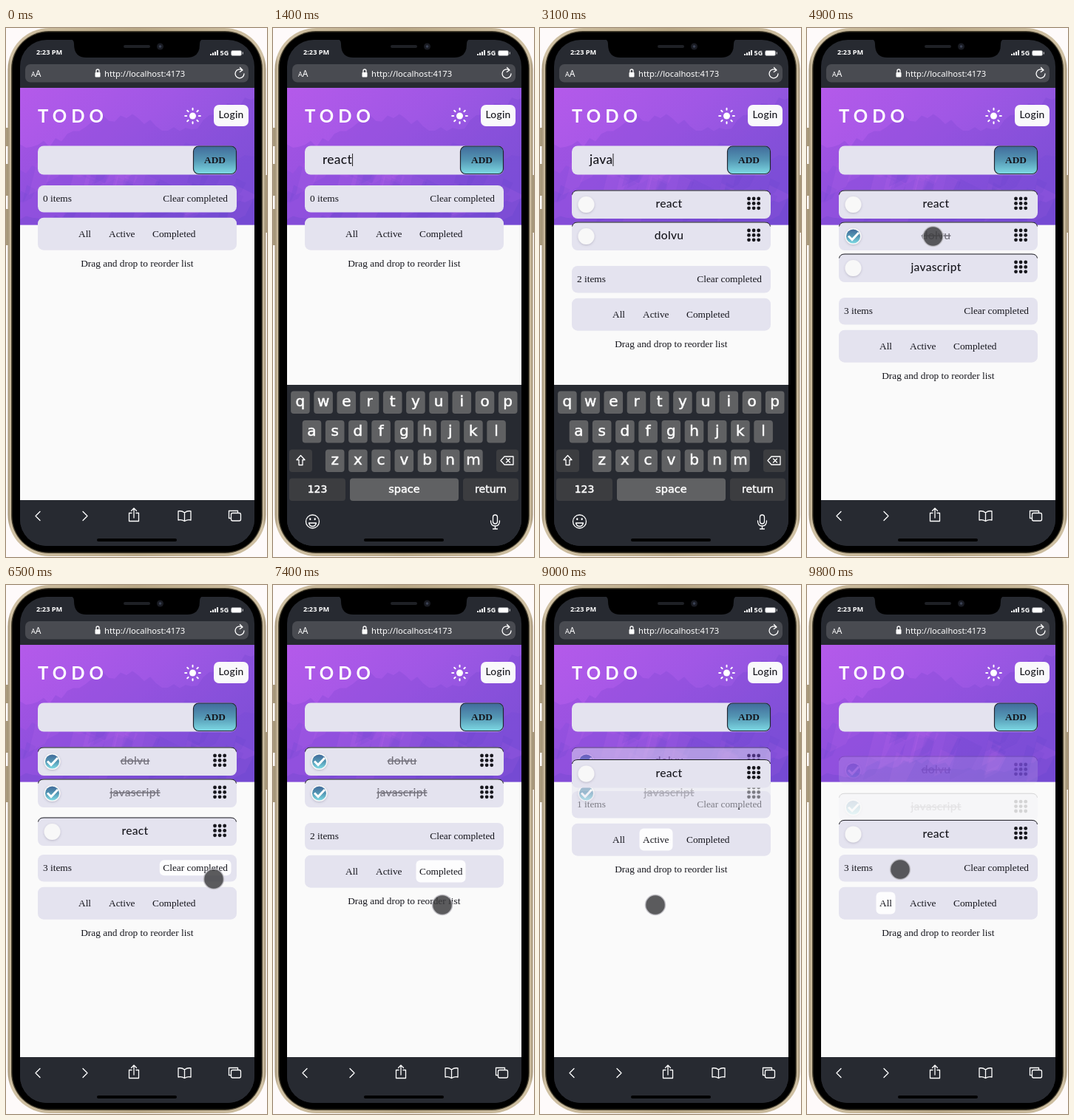
Recreate the animation shown at these times as an HTML page. Size 353x716 px, loop 9900 ms.

```html
<!DOCTYPE html>
<html lang="en">
<head>
<meta charset="utf-8">
<title>Todo app demo</title>
<style>
  html, body { margin: 0; width: 100%; height: 100%; overflow: hidden; background: #fefafa; }
  svg { display: block; width: 353px; height: 716px; }
  text { white-space: pre; }
  .serif { font: 13.33px "Liberation Serif", serif; fill: #15151c; }
  .round { font: 500 15.6px Lato, sans-serif; letter-spacing: .3px; fill: #17171d; }
  .ui { font-family: "Noto Sans", sans-serif; fill: #fff; }
  .key { font-family: "DejaVu Sans", sans-serif; fill: #fff; stroke: #fff; stroke-width: .5; text-anchor: middle; }
  .icon { fill: none; stroke: #fff; stroke-width: 1.3; stroke-linecap: round; stroke-linejoin: round; }
  .done { fill: #74727c; text-decoration: line-through; }
  .bar { fill: #e4e3ef; }
</style>
</head>
<body>
<svg viewBox="0 0 353 716">
  <defs>
    <linearGradient id="gold" x2="1" y2="0">
      <stop stop-color="#a09074"/><stop offset=".012" stop-color="#d0c1a4"/>
      <stop offset=".5" stop-color="#b8a786"/>
      <stop offset=".988" stop-color="#d0c1a4"/><stop offset="1" stop-color="#a09074"/>
    </linearGradient>
    <linearGradient id="hero" x2="1" y2=".6">
      <stop stop-color="#b45aea"/><stop offset=".5" stop-color="#a057e5"/><stop offset="1" stop-color="#8454da"/>
    </linearGradient>
    <linearGradient id="teal" x2="0" y2="1">
      <stop stop-color="#416b9b"/><stop offset=".5" stop-color="#5497b4"/><stop offset="1" stop-color="#7edae4"/>
    </linearGradient>
    <filter id="soft" x="-50%" y="-50%" width="200%" height="200%">
      <feDropShadow dx="0" dy="1" stdDeviation="1.6" flood-color="#55506a" flood-opacity=".3"/>
    </filter>
    <clipPath id="screen"><rect x="19" y="16" width="317" height="685" rx="36"/></clipPath>
    <clipPath id="heroArea"><path d="M19 81H336V266.500H19Z"/></clipPath>
  </defs>

  <!-- phone body -->
  <path fill="#a99a7c" d="M0 135h4v25h-4zM0 184h4v43h-4zM0 245h4v49h-4zM349 199h4v78h-4z"/>
  <rect x="2.5" width="349" height="715" rx="56" fill="url(#gold)"/>
  <rect x="7" y="4" width="340" height="707" rx="51" fill="#47402f"/>
  <rect x="8.5" y="5.5" width="337" height="704" rx="49"/>

  <g clip-path="url(#screen)">
    <path fill="#272a31" d="M19 16H336V701H19Z"/>
    <path fill="#fafafa" d="M19 81H336V639H19Z"/>
    <g clip-path="url(#heroArea)">
      <path fill="url(#hero)" d="M19 81H336V267H19Z"/>
      <g id="mountains"></g>
    </g>

    <text x="43" y="128" style="font:700 24px Lato,sans-serif;letter-spacing:6px" fill="#fff">TODO</text>
    <g id="sun" transform="translate(252.5 119)" stroke="#fff" stroke-width="2" stroke-linecap="round"></g>
    <rect x="281" y="104" width="47" height="29" rx="7" fill="#f9f9fb"/>
    <text class="round" x="304.5" y="122" text-anchor="middle" style="font-size:13.8px">Login</text>

    <rect class="bar" x="43" y="159.5" width="269" height="39" rx="8"/>
    <text id="typed" class="round" x="67" y="184" style="font-size:17.4px"></text>
    <path id="caret" stroke="#222" d="M0 170v17"/>
    <rect x="253.5" y="160" width="58" height="37.5" rx="7" fill="url(#teal)" stroke="#202531" stroke-width="1.2"/>
    <text class="serif" x="282.5" y="183" text-anchor="middle" style="font-weight:700">ADD</text>

    <g id="panel">
      <rect class="bar" x="43" width="269" height="36.5" rx="8"/>
      <rect class="bar" x="43" y="43.7" width="269" height="44" rx="8"/>
      <text id="count" class="serif" x="50" y="22.3"></text>
      <g id="options"></g>
      <text class="serif" x="177.3" y="109.7" text-anchor="middle">Drag and drop to reorder list</text>
    </g>
    <g id="list"></g>

    <!-- browser toolbar -->
    <path fill="#272a31" d="M19 639H336V701H19Z"/>
    <g class="icon">
      <path d="M46 654.5l-6 6 6 6M104 654.5l6 6-6 6"/>
      <path d="M170 656.5h-3.5v11h13v-11H176M173 663v-13m-3.500 3.500l3.500-3.500 3.500 3.500"/>
      <path d="M241.500 656q-4-3-8.500-2v12q4.500-1 8.500 1.500 4-2.500 8.500-1.500v-12q-4.500-1-8.500 2v11.500"/>
      <path d="M304.500 663.500h-3v-10h12v2"/>
      <rect x="304.500" y="656.500" width="13" height="10.500" rx="2"/>
    </g>

    <g id="keyboard">
      <path fill="#272a31" d="M19 483H336V701H19Z"/>
      <g id="keys"></g>
      <g class="icon">
        <path d="M37.500 578.500l5.500 6h-3v7h-5v-7h-3z"/>
        <path d="M313 580h12v11h-12l-5-5.500zM315.500 583l5 5m0-5l-5 5"/>
        <circle cx="53.500" cy="668" r="9"/>
        <path d="M48.500 670h10q-1 4.500-5 4.500t-5-4.500z"/>
        <path stroke-width="2.300" d="M50.300 664.500v.5M56.700 664.500v.5"/>
        <rect x="297.500" y="659" width="6" height="12" rx="3"/>
        <path d="M294.500 667q0 7 6 7t6-7M300.500 674v4m-3 0h6"/>
      </g>
    </g>
    <rect x="123" y="691" width="108" height="4" rx="2"/>

    <!-- status and address bars -->
    <path d="M86 15q6 0 6 7 0 18 17 18H245q17 0 17-18 0-7 6-7z"/>
    <rect x="159" y="23" width="36" height="4" rx="2" fill="#1e2025"/>
    <circle cx="208.500" cy="25" r="4.500" fill="#191b22"/>
    <circle cx="208.500" cy="25" r="1.800" fill="#3b4254"/>
    <text class="ui" x="41" y="36.300" font-size="9.200" font-weight="700">2:23 PM</text>
    <path fill="#fff" d="M276 35h2v2h-2zM279 33.500h2v3.500h-2zM282 32h2v5h-2zM285 30h2v7h-2z"/>
    <text class="ui" x="289.500" y="36.800" font-size="9" font-weight="700">5G</text>
    <rect x="304.500" y="30.500" width="14" height="7" rx="2" fill="#fff" stroke="#8b8d92" stroke-width=".8"/>
    <path stroke="#b9babd" stroke-width="1.200" d="M320.300 32.500v3"/>
    <rect x="26" y="49" width="302" height="24.500" rx="7" fill="#494b51"/>
    <text class="ui" x="34" y="66" font-size="9">A<tspan font-size="12">A</tspan></text>
    <rect x="120.500" y="60" width="7" height="6.500" rx="1" fill="#fff"/>
    <path class="icon" d="M122 60v-2q0-2 2-2t2 2v2"/>
    <text class="ui" x="133" y="65.500" font-size="11.200">http://localhost:4173</text>
    <path class="icon" d="M319.500 57A6 6 0 1 0 322 62M316.500 53.500l3.500 3.500-3.800 2.500"/>
  </g>
  <circle id="pointer" r="13.500" fill="#3b3b3e" fill-opacity=".84" stroke="#c3c2c8" stroke-opacity=".8" stroke-width="1.600"/>
</svg>

<script>
const LOOP = 9900;
const $ = id => document.getElementById(id);
const range = n => [...Array(n).keys()];
const mix = (a, b, k) => a + (b - a) * k;
const progress = (t, start, duration) => Math.min(1, Math.max(0, (t - start) / duration));
const smooth = k => k * k * (3 - 2 * k);
const overshoot = k => 1 + 3.5 * (k - 1) ** 3 + 2.5 * (k - 1) ** 2;
const rect = (x, y, w, h, r, attrs = '') =>
  `<rect x="${x}" y="${y}" width="${w}" height="${h}" rx="${r}" ${attrs}/>`;

// The list and filter at each moment; all movement follows from these.
const scenes = [
  { at: 0, shown: [] },
  { at: 1600, shown: ['react'] },
  { at: 2400, shown: ['react', 'dolvu'] },
  { at: 3900, shown: ['react', 'dolvu', 'javascript'] },
  { at: 5900, shown: ['dolvu', 'javascript', 'react'] },
  { at: 7000, shown: ['dolvu', 'javascript'], filter: 'Completed' },
  { at: 8200, shown: ['dolvu', 'javascript', 'react'], filter: 'All' },
  { at: 8900, shown: ['react'], filter: 'Active' },
  { at: 9600, shown: ['dolvu', 'javascript', 'react'], filter: 'All' },
];
const typingStart = { react: 800, dolvu: 1800, javascript: 2700 };
const checkedAt = { dolvu: 4800, javascript: 5400 };
const keyboard = { open: 400, close: 4000 };
const drag = { name: 'react', start: 5750, end: 6300 };
// Arrival time and place; the pointer rests until it must leave for the next stop.
const stops = [
  [100, 190, 220], [400, 150, 180], [4700, 170.5, 282], [5300, 170.5, 325],
  [drag.start, 289, 239], [drag.end, 289, 343], [6500, 281, 398], [6900, 229, 433],
  [8000, 107, 393], [8800, 156, 433], [9400, 107, 347], [9800, 126, 385],
];

const random = n => { const v = Math.sin(n * 127.1) * 43758.5453; return v - Math.floor(v); };
const ridge = (seed, left, right, rough, fill, opacity) => {
  const points = range(41).map(i => {
    const bend = Math.sin(i / 4 + seed) + random(seed * 50 + i) - .5;
    return `${19 + i * 8} ${mix(left, right, i / 40) + rough * bend}`;
  });
  return `<path fill="${fill}" opacity="${opacity}" d="M19 267L${points.join('L')}V267Z"/>`;
};
const facet = i => {
  const x = 20 + random(i) * 310, y = 165 + random(i + 99) * 80, w = 8 + random(i + 40) * 22;
  return `<path fill="${i % 2 ? '#c868e8' : '#5a42c2'}" opacity=".14" d="M${x} ${y}l${w} ${w / 2}l${-w / 2} ${w}l${-w} ${w / 2}z"/>`;
};
$('mountains').innerHTML =
  ridge(1, 150, 108, 14, '#6a3cc8', .2) + ridge(4, 205, 165, 16, '#6a45d0', .16) +
  range(30).map(facet).join('') + ridge(7, 252, 240, 8, '#5a40c4', .22);

$('sun').innerHTML = '<circle r="4.5" fill="#fff" stroke="none"/>' +
  range(8).map(i => `<path d="M0 -8.3v-2" transform="rotate(${i * 45})"/>`).join('');

const option = (label, x, width, y, padding) =>
  ({ label, x, y, left: x - 4.5, top: y - 9.5 - padding, width: width + 9, height: 10 + 2 * padding });
const options = [
  option('Clear completed', 212.3, 87.7, 22.3, 5.5),
  option('All', 98, 17, 70, 10),
  option('Active', 139, 36, 70, 10),
  option('Completed', 198, 58, 70, 10),
];
$('options').innerHTML = options.map(o => '<g>' +
  rect(o.left, o.top, o.width, o.height, 6, 'fill="#fdfdfe"') +
  `<text class="serif" x="${o.x}" y="${o.y}">${o.label}</text></g>`).join('');
options.forEach((o, i) => o.pill = $('options').children[i].firstChild);

const key = (x, y, w, fill, label = '', size = 14, drop = 19.5) => rect(x, y, w, 30.5, 4, `fill="${fill}"`) +
  `<text class="key" x="${x + w / 2}" y="${y + drop}" font-size="${size}">${label}</text>`;
const LIGHT = '#606163', DARK = '#3c3d40';
$('keys').innerHTML = ['qwertyuiop', 'asdfghjkl', 'zxcvbnm'].map((row, r) => [...row].map((letter, i) =>
    key(177.3 + (i - (row.length - 1) / 2) * 31.2 - 12.8, 491.5 + r * 39.5, 25.6, LIGHT, letter, 20, 20.5)
  ).join('')).join('') +
  key(22, 570.5, 31, DARK) + key(302, 570.5, 30, DARK) +
  key(22, 609.5, 76, DARK, '123') + key(104, 609.5, 147, LIGHT, 'space', 14.5) + key(257, 609.5, 75, DARK, 'return');

const dots = range(9).map(i =>
  `<circle cx="${282.5 + i % 3 * 6.6}" cy="${11.5 + Math.floor(i / 3) * 6.4}" r="2.4" fill="#17171d"/>`).join('');
const items = Object.keys(typingStart).map(name => {
  const node = document.createElementNS('http://www.w3.org/2000/svg', 'g');
  node.innerHTML = rect(43, 0, 269, 38.5, 8, 'class="bar"') +
    `<path d="M43.5 6q1-5.500 7.500-5.500H304q6.500 0 7.500 5.500" fill="none" stroke="#17171d"/>
    <circle cx="62.500" cy="19.500" r="11" fill="#f8f8f8" filter="url(#soft)"/>
    <g class="tick"><circle cx="62.500" cy="19.500" r="9.500" fill="url(#teal)"/>
      <path d="M56 19l5 5 9-9.500" fill="none" stroke="#fff" stroke-width="3"/></g>
    <text class="round" x="174.500" y="23.700" text-anchor="middle">${name}</text>` + dots;
  $('list').prepend(node);
  return { name, node, tick: node.querySelector('.tick'), label: node.querySelector('text') };
});

const move = (node, x, y) => node.setAttribute('transform', `translate(${x} ${y})`);
const show = (node, on) => node.setAttribute('visibility', on ? 'visible' : 'hidden');
const slotY = i => 219.5 + 43 * i;

function pointerAt(t) {
  const next = stops.findIndex(([arrive]) => t < arrive);
  if (next < 1) return stops.at(next).slice(1);
  const [leave, x0, y0] = stops[next - 1], [arrive, x1, y1] = stops[next];
  const travel = Math.min(300, arrive - leave);
  const k = smooth(progress(t, arrive - travel, travel));
  return [mix(x0, x1, k), mix(y0, y1, k)];
}

function itemPose(name, t, pointerY) {
  const current = scenes.findLastIndex(s => t >= s.at);
  const { at, shown } = scenes[current];
  const to = shown.indexOf(name);
  const from = current ? scenes[current - 1].shown.indexOf(name) : -1;
  const k = progress(t, at, 500);
  if (to < 0) return { y: slotY(from), alpha: from < 0 ? 0 : 1 - progress(t, at, 200) };
  if (from < 0) return { y: slotY(to) + (20 + 12 * to) * (1 - k), alpha: k * k };
  let y = mix(slotY(from), slotY(to), overshoot(k));
  if (name === drag.name && t >= drag.start && t < drag.end + 400) {
    const held = Math.min(pointerY, stops.find(([arrive]) => arrive === drag.end)[2]) - 19.5;
    y = mix(held, y, progress(t, drag.end, 400));
  }
  return { y, alpha: 1 };
}

function draw(t) {
  const scene = scenes.findLast(s => t >= s.at);
  const [px, py] = pointerAt(t);
  const pointing = (t >= 100 && t < 700) || t >= 4400;
  move($('pointer'), px, py);
  show($('pointer'), pointing);

  for (const { name, node, tick, label } of items) {
    const { y, alpha } = itemPose(name, t, py);
    const done = t >= checkedAt[name];
    move(node, 0, y);
    node.setAttribute('opacity', alpha);
    tick.setAttribute('opacity', done ? 1 : 0);
    label.classList.toggle('done', done);
  }

  const count = scene.shown.length;
  const panelY = count ? 236 + 43 * count : 213;
  move($('panel'), 0, panelY);
  $('count').textContent = `${count} items`;
  for (const o of options) {
    const dx = px - o.left, dy = py - panelY - o.top;
    const hovered = pointing && dx > 0 && dx < o.width && dy > 0 && dy < o.height + 6;
    show(o.pill, hovered || o.label === scene.filter);
  }

  const editing = t >= keyboard.open && t < keyboard.close;
  const word = items.findLast(({ name }) => t >= typingStart[name] && !scene.shown.includes(name));
  $('typed').textContent = editing && word
    ? word.name.slice(0, 1 + Math.floor((t - typingStart[word.name]) / 120)) : '';
  move($('caret'), 67.5 + $('typed').getComputedTextLength(), 0);
  show($('caret'), editing);
  const raised = smooth(progress(t, keyboard.open, 300)) - smooth(progress(t, keyboard.close, 300));
  move($('keyboard'), 0, 218 * (1 - raised));
}

// The screen refreshes in steps of 100 ms.
function frame() {
  const t = performance.now() % LOOP;
  draw(t - t % 100);
  requestAnimationFrame(frame);
}
frame();
</script>
</body>
</html>
```
